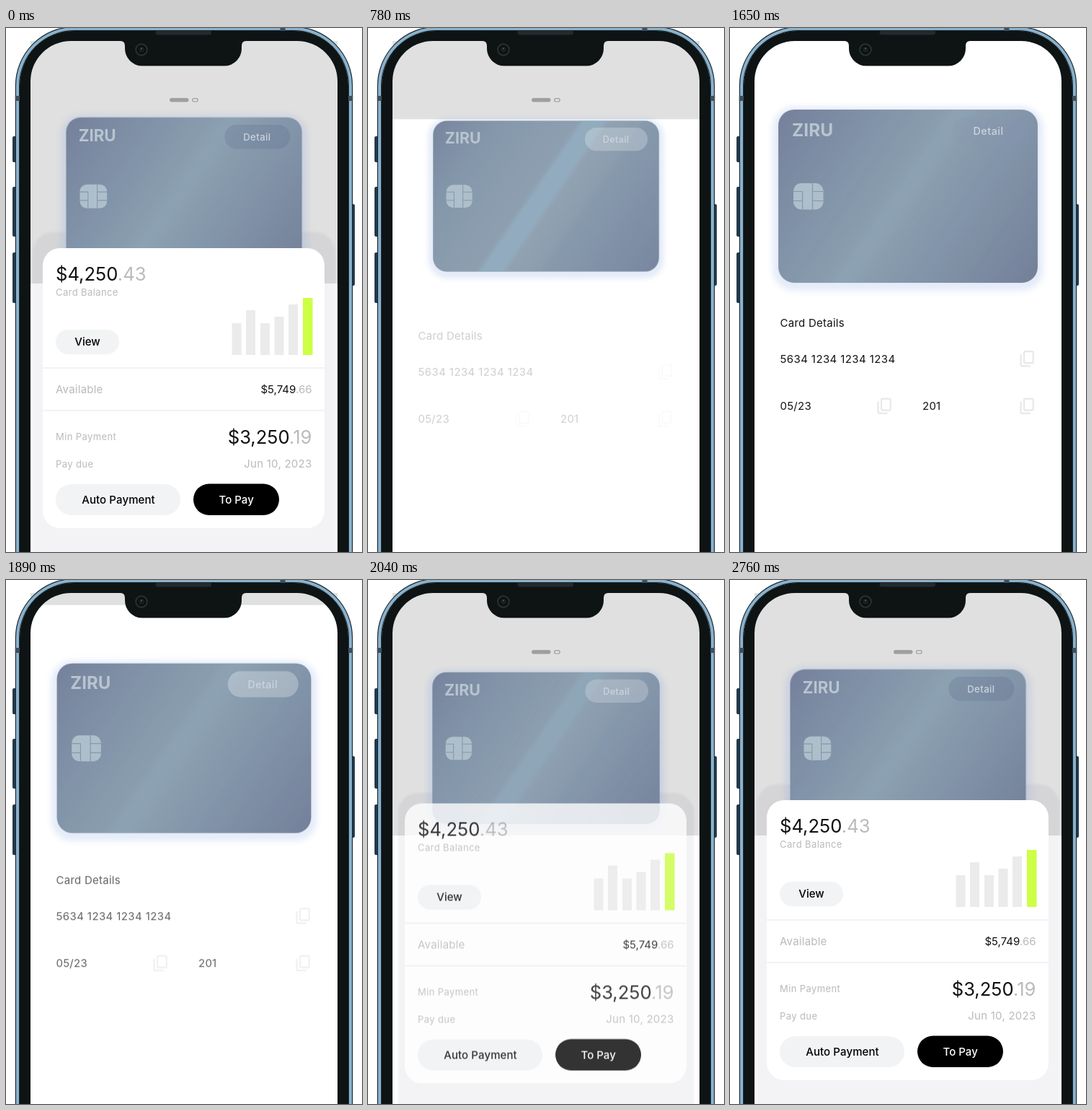
An HTML page for the animation above (3.06 s loop, 494 by 726 pixels).

```html
<!DOCTYPE html>
<html lang="en">
<head>
<meta charset="utf-8">
<title>Card details transition</title>
<style>
  html, body { margin: 0; width: 100%; height: 100%; overflow: hidden; background: #fff; }
  svg { display: block; width: 494px; height: 726px; font-family: Inter, "Open Sans", sans-serif; }

  .gray, .pager, .card, .pill, .streak, .panel, .sheet, .details, .press {
    animation: 3060ms linear infinite;
  }
  .gray    { animation-name: gray; transform-origin: 0 18px; }
  .pager   { animation-name: pager; }
  .card    { animation-name: card; }
  .pill    { animation-name: pill; }
  .streak  { animation-name: streak; }
  .panel   { animation-name: panel; transform-origin: 247px 500px; filter: blur(1.5px); }
  .sheet   { animation-name: sheet; }
  .details { animation-name: details; }
  .press   { animation-name: press; transform-origin: 155.5px 653.5px; }

  @keyframes gray {
    0%, 21.96% { transform: scaleY(1); animation-timing-function: ease-in-out; }
    27.84%, 60.78% { transform: scaleY(0); animation-timing-function: cubic-bezier(.5, 0, .4, 1); }
    66.67%, 100% { transform: scaleY(1); }
  }
  @keyframes pager {
    0%, 25.8% { opacity: 1; }
    25.81%, 62.6% { opacity: 0; }
    62.61%, 100% { opacity: 1; }
  }
  @keyframes card {
    0%, 18.8% { transform: translate(247px, 233px) scale(.909); animation-timing-function: ease-in-out; }
    24.2% { transform: translate(247px, 233px) scale(.865); animation-timing-function: ease-in; }
    25.49% { transform: translate(247px, 233px) scale(.87); animation-timing-function: cubic-bezier(.3, .3, .4, 1); }
    33.2%, 53.4% { transform: translate(247px, 233px) scale(1); animation-timing-function: ease-in; }
    61.765% { transform: translate(247px, 233px) scale(.981); }
    64.706% { transform: translate(247px, 233px) scale(.887); animation-timing-function: ease-out; }
    65.9% { transform: translate(247px, 233px) scale(.874); animation-timing-function: ease-in-out; }
    70.5%, 100% { transform: translate(247px, 233px) scale(.909); }
  }
  @keyframes pill {
    0%, 18.8% { fill: rgba(80, 98, 128, .2); }
    22%, 27% { fill: rgba(255, 255, 255, .24); }
    33%, 53.4% { fill: rgba(128, 138, 168, .22); }
    60%, 66% { fill: rgba(255, 255, 255, .28); }
    70.5%, 100% { fill: rgba(80, 98, 128, .2); }
  }
  @keyframes streak {
    0%, 18.8% { opacity: .08; }
    23%, 27% { opacity: 1; }
    33%, 53.4% { opacity: .08; }
    61.765% { opacity: .2; }
    64.706% { opacity: .8; }
    70.5%, 100% { opacity: .08; }
  }
  @keyframes panel {
    0%, 18.8% { opacity: 1; transform: none; }
    23.5%, 62% { opacity: 0; transform: translateY(28px) scaleX(.93); }
    64.706% { opacity: .85; transform: translateY(26px) scaleX(.957); animation-timing-function: ease-out; }
    70%, 100% { opacity: 1; transform: none; }
  }
  @keyframes sheet {
    0%, 18.8% { opacity: 1; transform: none; animation-timing-function: ease-in; }
    23.8%, 62% { opacity: 0; transform: translateY(22px); }
    64.706% { opacity: .5; transform: translateY(11px); animation-timing-function: ease-out; }
    69.5%, 100% { opacity: 1; transform: none; }
  }
  @keyframes details {
    0%, 24% { opacity: 0; transform: translateY(22px); }
    25.49% { opacity: .2; transform: translateY(18px); animation-timing-function: cubic-bezier(.2, .4, .5, 1); }
    33%, 53.4% { opacity: 1; transform: none; animation-timing-function: ease-in; }
    61.765% { opacity: .67; transform: translateY(7px); }
    64.3%, 100% { opacity: 0; transform: translateY(22px); }
  }
  @keyframes press {
    0%, 76.47% { fill: #f2f3f5; transform: none; }
    77.451% { fill: #dddee0; transform: scale(1.008); }
    79.412%, 83.6% { fill: #d9dadd; transform: scale(1.008); }
    90.1%, 100% { fill: #f2f3f5; transform: none; }
  }

  .big { font-size: 25.6px; }
  .mid { font-size: 15px; letter-spacing: .25px; }
  .small { font-size: 13px; letter-spacing: .4px; }
  .bold { font-size: 15px; font-weight: 500; }
  .mute { fill: #bababa; }
  .end { text-anchor: end; }
  .center { text-anchor: middle; }
</style>
</head>
<body>
<svg viewBox="0 0 494 726" fill="#111">
  <defs>
    <linearGradient id="metal" gradientUnits="userSpaceOnUse" x1="2" y1="-2" x2="358" y2="242">
      <stop offset="0" stop-color="#76819c"/>
      <stop offset=".25" stop-color="#8092a8"/>
      <stop offset=".48" stop-color="#8ca1b1"/>
      <stop offset=".68" stop-color="#8395aa"/>
      <stop offset="1" stop-color="#748099"/>
    </linearGradient>
    <linearGradient id="bands" gradientUnits="userSpaceOnUse" x1="2" y1="-2" x2="358" y2="242">
      <stop offset="0" stop-color="#8ca1b1" stop-opacity=".1"/>
      <stop offset=".2" stop-color="#8ca1b1" stop-opacity=".5"/>
      <stop offset=".44" stop-color="#8f9fb0" stop-opacity=".7"/>
      <stop offset=".46" stop-color="#92abbe"/>
      <stop offset=".52" stop-color="#92abbe"/>
      <stop offset=".54" stop-color="#93a3b3" stop-opacity=".8"/>
      <stop offset=".63" stop-color="#93a3b3" stop-opacity=".5"/>
      <stop offset=".65" stop-color="#8ca1b1" stop-opacity=".4"/>
      <stop offset="1" stop-color="#8498b0" stop-opacity=".3"/>
    </linearGradient>
    <filter id="soft" x="-20%" y="-20%" width="140%" height="140%">
      <feGaussianBlur stdDeviation="4.5"/>
    </filter>
    <g id="copy" fill="none" stroke="#e8e8e8" stroke-width="2.2">
      <rect x="5.6" y="1.1" width="12.6" height="16" rx="1.6"/>
      <path d="M1.1 5V19.4Q1.1 21.4 3.1 21.4H14"/>
    </g>
  </defs>

  <rect class="gray" x="34" y="18" width="426" height="336" fill="#e0e0e0"/>
  <g class="pager">
    <rect x="227" y="97" width="26.5" height="5.5" rx="2.75" fill="#9f9f9f"/>
    <rect x="258.6" y="97.6" width="7.6" height="4.4" rx="2.2" fill="none" stroke="#9f9f9f" stroke-width="1.2"/>
  </g>

  <rect class="panel" x="37" y="283" width="420" height="470" rx="28" fill="rgba(20, 35, 70, .052)"/>

  <g class="details mid">
    <text x="69.5" y="414">Card Details</text>
    <text x="69.5" y="464" letter-spacing=".4">5634 1234 1234 1234</text>
    <text x="69.5" y="529">05/23</text>
    <text x="267" y="529">201</text>
    <use href="#copy" x="402.5" y="447"/>
    <use href="#copy" x="204.5" y="512.5"/>
    <use href="#copy" x="402.5" y="512.5"/>
  </g>

  <g class="card">
    <g transform="translate(-180 -120)">
      <rect x="-8" y="-4" width="376" height="255" rx="30" fill="#7d9fdc" opacity=".2" filter="url(#soft)"/>
      <rect width="360" height="240" rx="22" fill="url(#metal)"/>
      <rect class="streak" width="360" height="240" rx="22" fill="url(#bands)"/>
      <text x="19" y="36.5" font-size="24.5" font-weight="700" fill="#b9c4d0">ZIRU</text>
      <rect class="pill" x="242" y="11" width="100" height="37" rx="18.5"/>
      <text class="center" x="291.5" y="35" font-size="14.4" font-weight="500" letter-spacing=".5" fill="#cbd3dd">Detail</text>
      <rect x="21" y="102" width="41.5" height="36.5" rx="11" fill="#adbfcb"/>
      <path d="M21 113.5H33.5V138M21 126.5H33.5M47.5 102V138.5M47.5 113.5H62.5M47.5 126.5H62.5" fill="none" stroke="#8697a9" stroke-width="1.2"/>
    </g>
  </g>

  <g class="sheet">
    <rect x="51" y="305" width="391" height="388" rx="24" fill="#fff"/>
    <path d="M51 471H442M51 530H442" stroke="#f1f2f4" stroke-width="2.2"/>

    <text class="big" x="69" y="350">$4,250<tspan class="mute">.43</tspan></text>
    <text class="small mute" x="69" y="371">Card Balance</text>
    <rect x="69" y="418" width="88" height="34" rx="17" fill="#f2f3f5"/>
    <text class="bold center" x="113" y="440" fill="#000">View</text>

    <path d="M313.5 453V409h13v44zM333 453V391h13v62zM353 453V409h13v44zM372.5 453V400h13v53zM392 453V383h13v70z" fill="#ebebeb"/>
    <rect x="412" y="374" width="13.5" height="79" fill="#ccff45"/>

    <text class="mid mute" x="69" y="506">Available</text>
    <text class="end" x="424.5" y="506" font-size="15">$5,749<tspan class="mute">.66</tspan></text>

    <text class="small mute" x="69" y="571">Min Payment</text>
    <text class="big end" x="424.5" y="576">$3,250<tspan class="mute">.19</tspan></text>
    <text class="small mute" x="69" y="609">Pay due</text>
    <text class="mid mute end" x="424.5" y="609">Jun 10, 2023</text>

    <rect class="press" x="69" y="632" width="173" height="43" rx="21.5" fill="#f2f3f5"/>
    <text class="bold center" x="156" y="659" fill="#000" letter-spacing=".1">Auto Payment</text>
    <rect x="260" y="631.5" width="119" height="43.5" rx="21.75" fill="#000"/>
    <text class="bold center" x="319.7" y="659" fill="#fff">To Pay</text>
  </g>

  <g class="phone">
    <path d="M9 152q0-2 2-2h3v36h-3q-2 0-2-2zM9 222q0-2 2-2h3v69h-3q-2 0-2-2zM9 313q0-2 2-2h3v70h-3q-2 0-2-2zM480 244h2q2 0 2 2v109q0 2-2 2h-2z" fill="#223a4c"/>
    <g fill="none">
      <rect x="16" y="1" width="462" height="900" rx="79" stroke="#182b39" stroke-width="6.4"/>
      <rect x="16" y="1" width="462" height="900" rx="79" stroke="#8cb1ca" stroke-width="4"/>
    </g>
    <path d="M12.8 94h6.4v7h-6.4zM474.8 94h6.4v7h-6.4zM380.5 0h7v4h-7z" fill="#3f4f5b"/>
    <path fill="#0e1314" fill-rule="evenodd" d="M19 740V80A75 76 0 0 1 94 4H400A75 76 0 0 1 475 80V740Z
      M34 740V74A56 56 0 0 1 90 18H159Q165 18 165 25V28A24 24 0 0 0 189 52.5H303A24 24 0 0 0 327 28V25Q327 18 333 18H404A56 56 0 0 1 460 74V740Z"/>
    <path d="M207.500 3H285V6q0 3.500-3.500 3.500H211q-3.500 0-3.500-3.500z" fill="#23292c"/>
    <circle cx="188" cy="30" r="7.800" fill="#0b0f10" stroke="#2b3031" stroke-width="2"/>
    <circle cx="188" cy="30" r="4" fill="#171e20"/>
    <circle cx="188" cy="28.500" r="1" fill="#566064"/>
  </g>
</svg>
</body>
</html>
```
